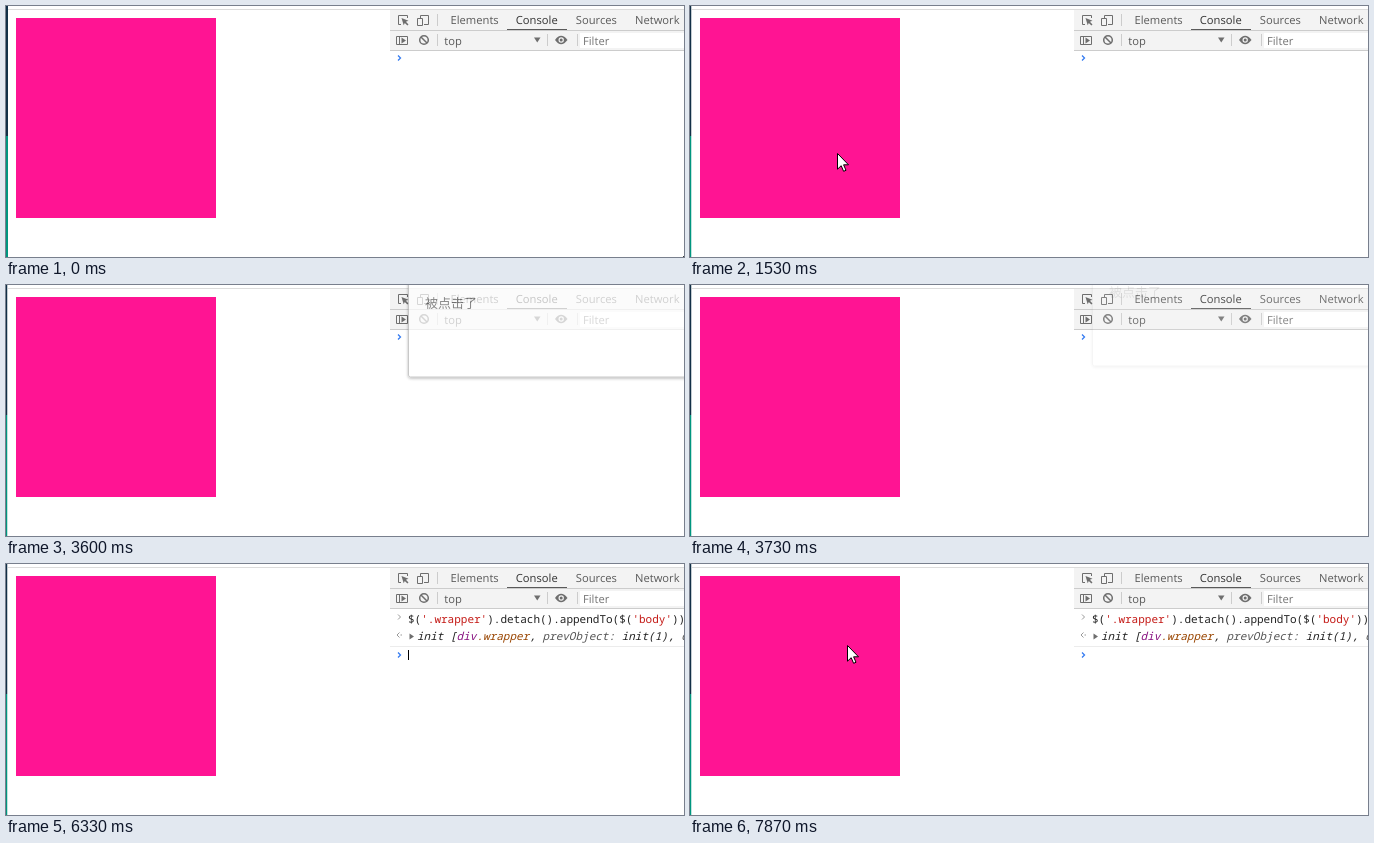
Animation, 678 px wide and 251 px high, one loop 8 s. Source, as an HTML page:

```html
<!DOCTYPE html>
<html lang="zh">
<head>
<meta charset="utf-8">
<title>Console demo</title>
<style>
  html, body { margin: 0; width: 100%; height: 100%; overflow: hidden; background: #fff; }
  svg { display: block; width: 678px; height: 251px; }
  text { white-space: pre; text-rendering: geometricPrecision; }
  .ui { font: 11.2px "Open Sans", "Noto Sans", sans-serif; fill: #5a5a5a; }
  .code { font: 11px "Noto Sans Mono", "Liberation Mono", monospace; fill: #222; }
  .result { font-style: italic; }
  .cn { font-family: "Noto Sans CJK SC", "Noto Sans CJK", sans-serif; }
  .str { fill: #c41a16; }
  .tag { fill: #881280; }
  .cls { fill: #994500; }
  .key { fill: #565656; }
  .icon { fill: none; stroke: #6e6e6e; }
  .solid { fill: #6e6e6e; }
  .sep { fill: #ccc; }
  .prompt { fill: none; stroke: #367cf1; stroke-width: 1.3; }
  .faded { fill: none; stroke: #999; }
</style>
</head>
<body>
<svg viewBox="0 0 678 251" xmlns="http://www.w3.org/2000/svg">
  <defs>
    <filter id="shadow" x="-5%" y="-10%" width="110%" height="125%">
      <feDropShadow dx="0" dy="1" stdDeviation="1.6" flood-opacity=".4"/>
    </filter>
    <path id="chevron" d="M-1.5 -2.5L1 0L-1.5 2.5"/>
  </defs>

  <!-- page -->
  <rect width="678" height="251" fill="#fff"/>
  <rect y="3" width="678" height="1" fill="#dcdcdc"/>
  <rect width="2" height="130" fill="#123047"/>
  <rect y="130" width="2" height="121" fill="#00967f"/>
  <rect id="edge" x="1" width="1" height="251" fill="#fff" opacity=".75"/>
  <rect x="10" y="12" width="200" height="200" fill="#ff1493"/>

  <!-- toolbars -->
  <rect x="384" y="4" width="294" height="41" fill="#f3f3f3"/>
  <path class="sep" d="M384 24h294v1H384zM384 44h294v1H384zM431 8h1v12h-1zM431 28h1v12h-1zM541 28h1v12h-1zM571 28h1v12h-1z"/>
  <rect x="501" y="23" width="60" height="1" fill="#5a5a5a"/>
  <rect x="574" y="27" width="104" height="15" fill="#fff"/>
  <path class="icon" d="M395 18.5h-2.5v-9h9V12"/>
  <path class="solid" d="M395.5 12l7 2.8-2.6 1 2.6 2.7-1.1 1.1-2.6-2.7-1.1 2.4z"/>
  <path class="icon" d="M414.5 13V9.500h8v9H418M411.500 12.500h5v7h-5z"/>
  <path class="icon" d="M390.500 30.500h11v8h-11zM393.500 30v9"/>
  <path class="solid" d="M395.500 31.500l4.500 3-4.500 3z"/>
  <g class="icon" stroke-width="1.5"><circle cx="418" cy="34" r="4.300"/><path d="M415 31l6 6"/></g>
  <path class="solid" d="M528 31.500h6.500l-3.250 5z"/>
  <path class="solid" d="M549 34q6-8.400 12.500 0q-6.500 8.400-12.500 0z"/>
  <circle cx="555.200" cy="34" r="2.700" fill="#f3f3f3"/>
  <circle cx="555.200" cy="34" r="1.500" class="solid"/>
  <g class="ui">
    <text x="444.500" y="18">Elements</text>
    <text x="509.800" y="18" fill="#333" style="fill:#333">Console</text>
    <text x="569.800" y="18">Sources</text>
    <text x="629" y="18">Network</text>
    <text x="438.300" y="38.500">top</text>
    <text x="577" y="38.500" style="fill:#757575">Filter</text>
  </g>

  <!-- console -->
  <g id="typed">
    <path d="M606.600 46h6.600v13h-6.600zM672.600 46h6.600v13h-6.600z" fill="#000" opacity=".08"/>
    <path d="M606.600 59h6.600v1h-6.600zM672.600 59h6.600v1h-6.600z" fill="#000" opacity=".45"/>
  </g>
  <text id="command" class="code" x="402"><tspan>$(</tspan><tspan class="str">'.wrapper'</tspan><tspan>).detach().appendTo($(</tspan><tspan class="str">'body'</tspan><tspan>))</tspan></text>
  <g id="output">
    <use href="#chevron" class="faded" x="393.500" y="53"/>
    <path class="faded" d="M393.500 68.500L391 71l2.500 2.500M394.500 71h1.500"/>
    <path d="M403.500 69.500l4.500 3-4.500 3z" fill="#6e6e6e"/>
    <text class="code result" x="411" y="76"><tspan>init [</tspan><tspan class="tag">div</tspan><tspan class="cls">.wrapper</tspan><tspan>, </tspan><tspan class="key">prevObject:</tspan><tspan> init(1), </tspan><tspan class="key">context:</tspan></text>
    <rect x="384" y="82" width="294" height="1" fill="#ececec"/>
  </g>
  <use id="prompt" href="#chevron" class="prompt" x="393.500"/>
  <rect id="caret" x="402" width="1" height="10" fill="#000"/>

  <!-- alert -->
  <g id="alert" class="cn">
    <rect x="403.500" y="-60" width="300" height="157" rx="2" fill="#fff" stroke="#b4b4b4" filter="url(#shadow)"/>
    <text x="420" y="2" font-size="15" fill="#222">此网页显示:</text>
    <text x="420" y="28" font-size="13" fill="#5c5c5c">被点击了</text>
  </g>

  <!-- pointers -->
  <path id="arrow" d="M.5 .5V16.200L4.200 12.700L6.600 18.300L9 17.300L6.600 11.800H11.500Z" fill="#fff" stroke="#000"/>
  <path id="beam" d="M0 .5h3.500l1 1 1-1H9M4.500 1v14M0 15.500h3.500l1-1 1 1H9" fill="none" stroke="#000" stroke-width="1.400"/>
</svg>
<script>
const LOOP = 8000, TICK = 200 / 3;
const el = {};
document.querySelectorAll('svg > [id]').forEach(n => el[n.id] = n);

const show = (name, on) => el[name].setAttribute('visibility', on ? 'visible' : 'hidden');
const place = (name, x, y) => el[name].setAttribute('transform', `translate(${Math.round(x)} ${Math.round(y)})`);
const within = (k, a, b) => k >= a && k < b;

// start tick, end tick, from x, y, to x, y, easing power for x, y
const moves = [
  [0, 3, 677, 250, 613, 221, 1.3, 1.3],
  [5, 8, 613, 221, 238, 177, 1.5, 1.5],
  [11, 16, 238, 177, 147, 147, 1.8, 1.8],
  [30, 32, 147, 147, 439, 86, 1.2, 1.2],
  [105, 113, 495, 52, 157, 81, 2.937, 1.55]
];

function pointerAt(k) {
  const [a, b, x0, y0, x1, y1, px, py] = moves.filter(m => m[0] <= k).pop();
  const left = 1 - Math.min(1, (k - a) / (b - a));
  return [x1 + (x0 - x1) * left ** px, y1 + (y0 - y1) * left ** py];
}

// how far the alert is open, 0 to 1
function alertAt(k) {
  if (within(k, 25, 27)) return (k - 24) / 3;
  if (within(k, 27, 54)) return 1;
  if (within(k, 54, 59)) return [0.72, 0.38, 0.13, 0.06, 0.02][k - 54];
  return 0;
}

function tickAt(t) {
  const k = Math.floor((t + 3.4) / TICK);
  return Math.round(k * TICK / 10) * 10 > t ? k - 1 : k;
}

function draw(t) {
  const k = tickAt(t);
  show('edge', k >= 23);

  const [x, y] = pointerAt(k);
  show('arrow', k < 33 || k >= 106);
  place('arrow', x, y);
  show('beam', within(k, 64, 94) || k === 105);
  if (k === 105) place('beam', x, y);
  else place('beam', 490, 45);

  const open = alertAt(k);
  show('alert', open > 0);
  el.alert.setAttribute('opacity', open);
  place('alert', open < 1 ? -1 : 0, -18 * (1 - open));

  const done = k >= 95;
  show('typed', within(k, 77, 94));
  show('command', within(k, 77, 94) || done);
  el.command.setAttribute('y', done ? 59 : 56);
  show('output', done);
  el.prompt.setAttribute('y', done ? 91 : 52);
  show('caret', within(k, 65, 73) || within(k, 94, 102) || within(k, 110, 118));
  el.caret.setAttribute('y', done ? 86 : 47);
}

const start = performance.now();
function loop() {
  draw((performance.now() - start) % LOOP);
  requestAnimationFrame(loop);
}
loop();
</script>
</body>
</html>
```
